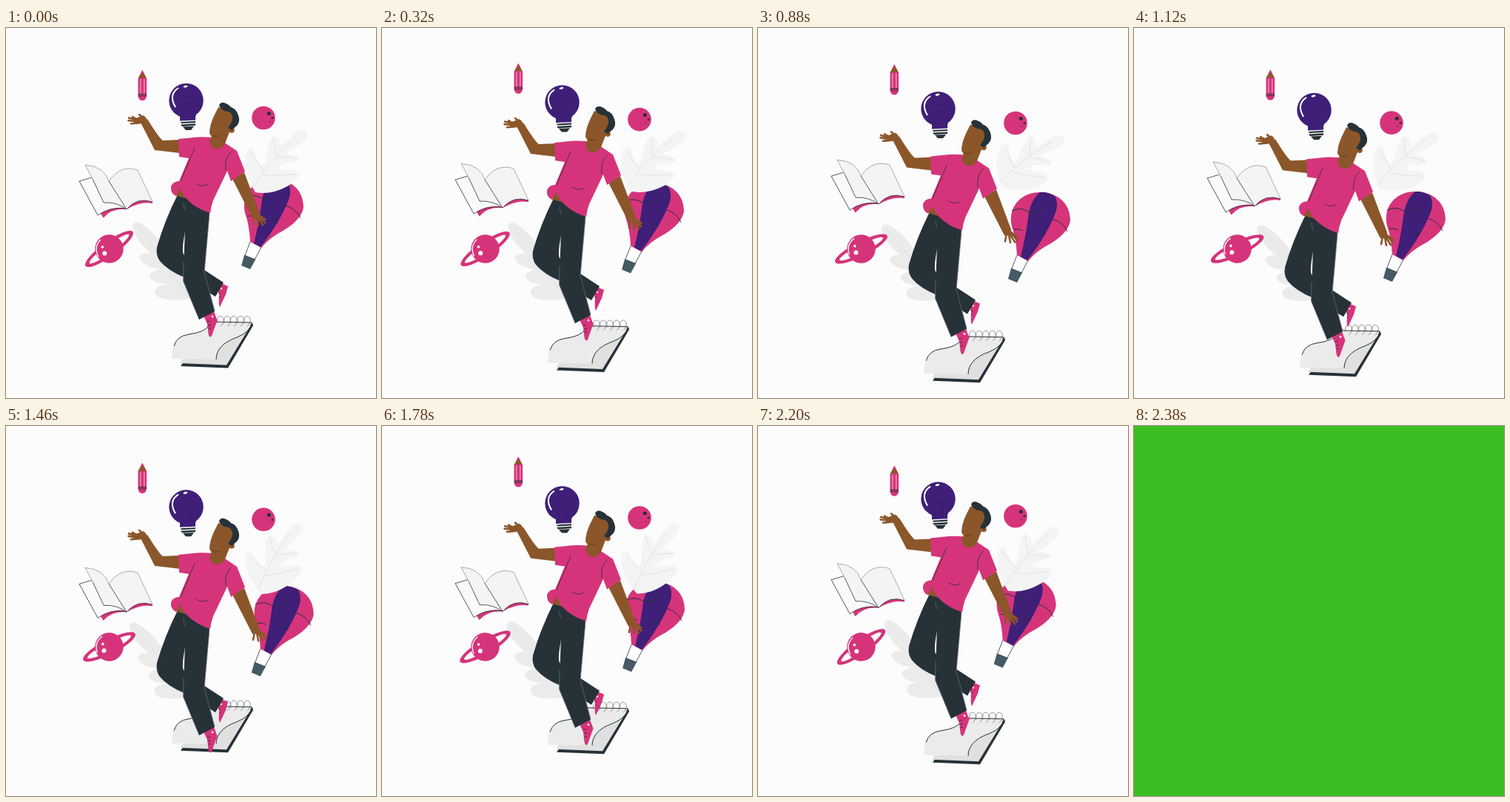
An HTML page with a canvas that plays this animation: 500 px wide and 500 px high, repeating every 2420 ms.

```html
<!DOCTYPE html>
<html lang="en">
<head>
<meta charset="utf-8">
<title>Juggling ideas</title>
<style>
html, body { margin: 0; width: 100%; height: 100%; overflow: hidden; background: #fcfcfc; }
canvas { display: block; width: 500px; height: 500px; }
</style>
</head>
<body>
<canvas id="stage" width="500" height="500"></canvas>
<script>
const ctx = document.getElementById('stage').getContext('2d');
const LOOP = 2420, FLASH = 2380, CYCLE = 2400, STEP = 20;
const PAPER = '#fcfcfc', PINK = '#d5347b', PURPLE = '#3f1f78', DARK = '#263238',
      SKIN = '#8b5629', SHADE = '#6f4220', GREEN = '#3abd20';

const ease = x => (1 - Math.cos(Math.PI * x)) / 2;

// Even there-and-back movement, 0 to 1 to 0
const swing = (t, period = CYCLE) => ease(2 * t / period);
// Faster rise than fall
const lift = t => t < 920 ? ease(t / 920) : 1 - ease((t - 920) / (CYCLE - 920));
// Up to 1, across to -1, back to rest
function sway(t) {
  if (t < 960) return ease(t / 960);
  if (t < 1560) return 1 - 2 * ease((t - 960) / 600);
  return ease((t - 1560) / (CYCLE - 1560)) - 1;
}

function fill(color, d) {
  ctx.fillStyle = color;
  ctx.fill(new Path2D(d));
}
function line(color, width, d) {
  ctx.strokeStyle = color;
  ctx.lineWidth = width;
  ctx.stroke(new Path2D(d));
}
function dot(color, x, y, rx, ry = rx, angle = 0) {
  ctx.fillStyle = color;
  ctx.beginPath();
  ctx.ellipse(x, y, rx, ry, angle, 0, 7);
  ctx.fill();
}
function moved(dx, dy, draw) {
  ctx.save();
  ctx.translate(dx, dy);
  draw();
  ctx.restore();
}
function turned(x, y, degrees, draw) {
  ctx.save();
  ctx.translate(x, y);
  ctx.rotate(degrees * Math.PI / 180);
  ctx.translate(-x, -y);
  draw();
  ctx.restore();
}

function lowerLeaf() {
  fill('#ebebeb', `M171 268Q172 260 181 263Q200 275 213 296Q235 325 250 365Q225 371 206 364
    Q196 356 206 349Q215 346 222 347Q195 345 194 334Q198 328 208 326
    Q183 322 180 309Q185 303 195 304Q174 286 171 268Z`);
  line('#dcdcdc', .7, 'M178 268Q218 320 247 364');
}

function upperLeaf() {
  fill('#f4f4f4', `M337 222Q320 195 324 170Q329 159 335 165Q338 178 346 186Q351 184 353 165
    Q357 146 362 146Q371 148 371 160L391 141Q403 132 408 142Q407 152 393 160L378 170
    Q390 170 396 176Q398 181 383 182Q370 184 366 191Q395 190 397 197Q394 207 380 214
    Q358 226 337 222Z`);
  line('#dedede', .8, `M333 216Q354 182 392 147M349 193Q341 184 331 169M366 172Q362 160 362 149
    M364 175Q376 173 394 177M346 198Q366 201 392 197`);
}

function balloon() {
  fill('#fff', 'M330 289L345 296L336 313L323 307Z');
  fill(PINK, `M330 289Q329 267 323 250C317 222 337 204 361 204C385 204 402 219 402 242
    Q400 258 376 273Q356 283 345 297Z`);
  fill(PURPLE, `M361 204Q347 216 345 239Q341 268 335 291L344 296Q372 260 383 229
    Q386 217 381 209Q371 203 361 204Z`);
  line(DARK, 1, `M323 229Q335 223 347 231Q361 231 368 225M378 240Q393 245 398 257
    M326 254Q333 253 338 256M359 260Q364 259 368 263`);
  line(DARK, .8, 'M330 289L323 307M345 296L336 313');
  fill('#455a64', 'M322 307L337 313L330 326L318 321Z');
  line(DARK, .8, 'M322 307L337 313');
}

function pencil() {
  fill(SKIN, 'M184.3 57L178.5 68H190Z');
  fill(PINK, 'M184.3 57L181.7 62H186.9Z');
  fill(PINK, 'M178.5 67.5H190V92Q189 98 184.3 98Q179.5 98 178.5 92Z');
  line('#f7cfe0', .9, 'M181.8 69V89M186.8 69V89');
  line(DARK, .9, 'M178.5 89.5H190M178.5 91.8H190');
}

function bulb() {
  dot(PURPLE, 243.5, 98, 23.2);
  fill(PURPLE, 'M231 112L235 120V125.5L256 124.5V120L259 110Z');
  line('#351a66', .8, 'M240 119L236 104Q234 100 238 101Q241 105 243 101Q246 105 249 101Q253 100 251 104L248 119');
  line('#fff', 2, 'M229 107Q219 90 233 81');
  dot('#fff', 242.5, 79, 3, 1.4, -.2);
  fill(DARK, 'M236 127L256 125.8V128L237 129Z M236 130.5L256 129.3V131.8L238 133Z M239 133.5L254 132.8L250 138H243Z');
}

function ball() {
  dot(PINK, 348, 121.5, 15.8);
  dot(DARK, 355.3, 115.5, 2.5);
  dot(DARK, 360, 121.6, 1.5);
  dot(DARK, 356, 126.5, .8);
}

function planet() {
  const tilt = -36 * Math.PI / 180;
  ctx.fillStyle = PINK;
  ctx.beginPath();
  ctx.ellipse(139.5, 298.5, 39.5, 10, tilt, 0, 7);
  ctx.ellipse(139.5, 298.5, 33, 5.5, tilt, 0, 7);
  ctx.fill('evenodd');
  dot(PINK, 139.5, 298.5, 19.2);
  line('#fff', 1.3, 'M125 309Q118 296 128 286');
  dot('#fff', 130.3, 296, 1.8);
  dot('#fff', 133.3, 304.5, 3);
}

function book() {
  fill(PINK, 'M127 249L131.5 256.5Q143 243 163 245Q182 234 198 237L197 233Q176 229 163 244Q145 238 127 249Z');
  fill('#fafafa', 'M99 207L116 202L133 236L161 243Q141 241 124 253Z');
  line(DARK, .8, 'M116 202L99 207L124 253Q141 241 161 244');
  fill('#f4f4f4', 'M107 185Q133 187 139 207L163 245Q150 235 132 236L117 204Z');
  fill('#f4f4f4', 'M139 207Q155 184 178 192L198 235Q177 228 163 245Z');
  line('#777', .6, 'M117 204L107 185Q133 187 139 207Q155 184 178 192L198 235');
  line(DARK, .8, 'M139 207L163 245Q150 235 132 236L117 204M163 245Q177 228 198 235');
}

function notebook() {
  fill(DARK, 'M236 457L240 451L298 454L333 398L334 402L300 459.5Z');
  fill('#e0e0e0', 'M277 397L333 398L298 455.5L235 453Z');
  fill('#ebebeb', `M224 447Q224 418 245 414Q270 411 273 402L278 397L332 398
    Q330 411 312 418Q284 428 284 448Z`);
  line(DARK, 1, `M227 430Q231 416 247 414Q269 411 274 402M277 397L332 398
    Q330 411 312 418Q284 428 284 448`);
  for (let x = 286; x < 330; x += 9)
    line('#666', .7, `M${x} 399C${x - 3} 386 ${x + 10} 387 ${x + 8} 397Q${x + 7} 401 ${x + 4} 403`);
}

function shoes() {
  fill(PINK, 'M285 349L291 345L300 349L297 360L289 377Q287 375 288 360Z');
  fill(PINK, 'M267 389L281 383L285.5 395L278 416Q275 420 273.5 413L272 400Z');
  dot('#fff', 279, 390, 1.4);
  dot('#fff', 291, 352, 1.2);
  line(DARK, .8, 'M272 397L276 396M272.5 402L277 401M273.5 406L277 406M287 358L290 359M288 363L290 364');
}

function trousers() {
  fill(DARK, `M232 225Q214 261 204 296Q202 307 208 315Q219 328 241 337L283 363L294 344L268 327
    L240 306Q237 301 242 275L262 245Z`);
  fill(DARK, 'M232 225Q246 226 275 249L268 330L282 383L261 394L239.5 342L242 268Z');
  line('#65747b', .7, 'M240 316L239.5 342L261 394M275 252L268 330L282 382M240 236Q240 242 242 246');
}

function arms() {
  fill(SKIN, 'M235 151L212 152Q207 149 191 123L181 126L201 165L235 169Z');
  fill(SKIN, 'M306 204L322 195L341 246Q344 252 340 257L333 257Z');
  ctx.lineCap = 'round';
  line(SKIN, 2.6, 'M184 126L166 121.5M184 127L165.5 125M182 128L169 129.2M181 126L171 120M187 123L180 117');
  fill(SKIN, 'M173 123L185 118Q192 121 189 128L173 130Z');
  line(SKIN, 2.6, 'M336 254L334 265M339 256L341 266.5M340 255L347 266M341 253L350 263M341 252L350.5 259');
  ctx.lineCap = 'butt';
}

function shirt() {
  fill(SKIN, 'M228 226L235 215L246 231L235 228Z');
  fill(PINK, `M233 150L258 147.5Q287 146 297 156L312 166L323 194L304 207L299 193L280 233
    Q277 241 276 250Q256 244 243 230L235 217L230 227Q222 224 223 214Q226 207 234 207
    L247 176L234 174Z`);
  line(DARK, .8, 'M255 162L236 207M305 167Q295 174 297 192M257 210Q265 216 274 211');
}

function head() {
  fill(SKIN, 'M278 145L303 138L296 156Q291 164 283 163Q276 161 275 153Z');
  fill(SKIN, 'M287 107L307 112L305 136Q299 145 289 148Q277 149 275 142Q275 132 281 119Z');
  line(SHADE, 1.3, 'M279 145Q284 148 289 145');
  dot(SKIN, 305, 138, 3.8);
  fill(DARK, `M288 105Q289 100 295 101Q301 103 304 107Q311 109 314 118Q317 126 312 132
    L305 138L300 135Q307 126 306 120Q305 114 300 113Q291 112 288 105Z`);
}

function person() {
  shoes();
  trousers();
  arms();
  shirt();
  head();
}

function render(t) {
  ctx.fillStyle = t < FLASH ? PAPER : GREEN;
  ctx.fillRect(0, 0, 500, 500);
  if (t >= FLASH) return;
  // The flash takes the first step of the movement
  const time = t + STEP;
  const half = swing(time), rise = lift(time), wave = sway(time);
  turned(248, 368, -3 * half, lowerLeaf);
  moved(20 * rise, 18 * rise, balloon);
  turned(367, 180, 12 * wave, upperLeaf);
  moved(0, -15.5 * swing(time, CYCLE / 2), pencil);
  moved(0, 13 * half, bulb);
  moved(0, 7 * rise, ball);
  turned(139.5, 298.5, 10.5 * half, planet);
  moved(0, -7 * wave, book);
  moved(0, 20 * wave, notebook);
  moved(0, 27.4 * half, person);
}

const start = performance.now();
function tick() {
  const elapsed = (performance.now() - start) % LOOP;
  render(Math.floor(elapsed / STEP) * STEP);
  requestAnimationFrame(tick);
}
tick();
</script>
</body>
</html>
```
